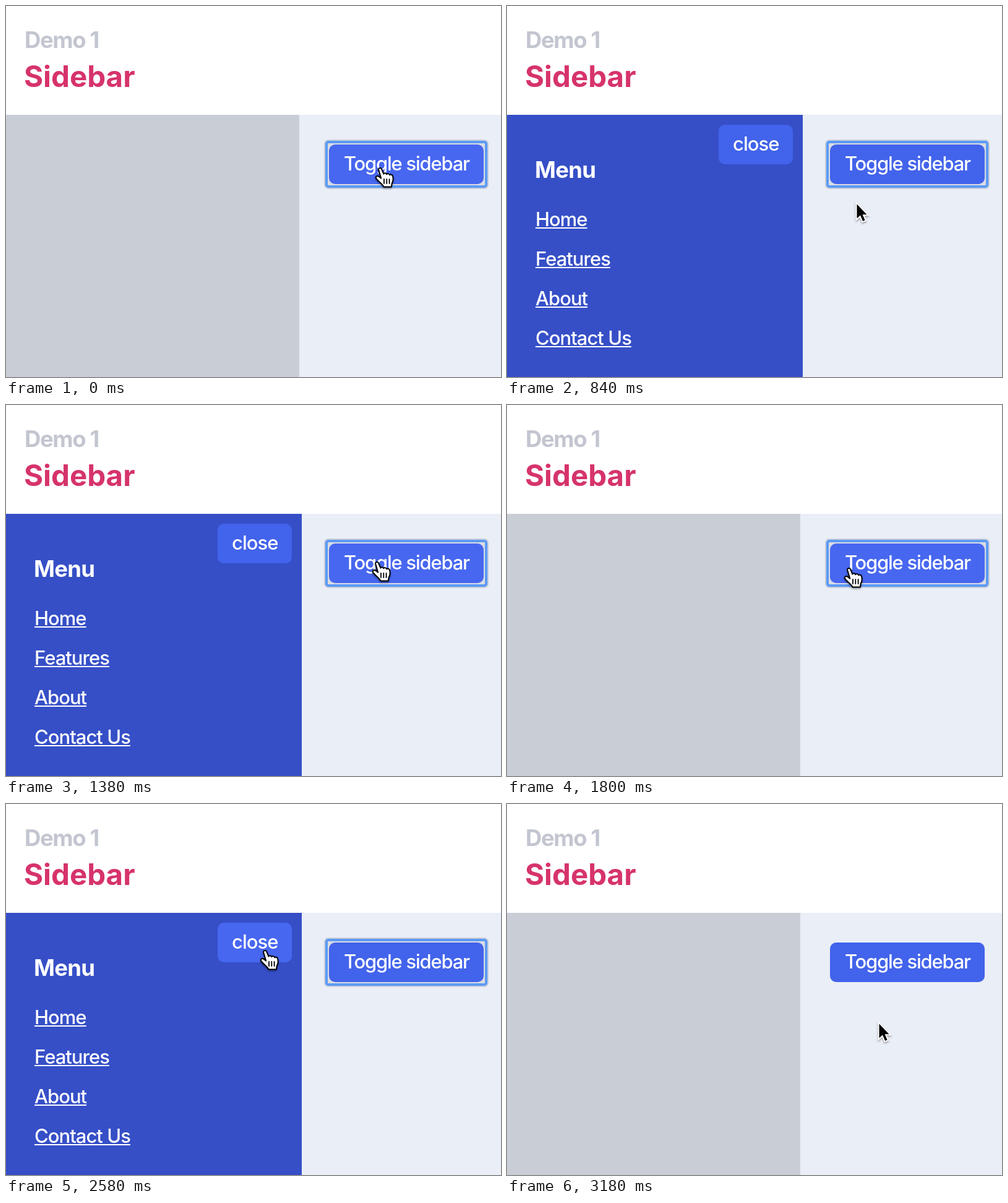
Recreate the animation shown at these times as an HTML page. Size 800x600 px, loop 3.24 s.

```html
<!DOCTYPE html>
<html lang="en">
<head>
<meta charset="utf-8">
<title>Sidebar demo</title>
<style>
  :root { --loop: 3240ms; --idle: #4263eb; --hover: #4767f0; }
  html, body { margin: 0; width: 100%; height: 100%; overflow: hidden; background: #fff; }
  .stage { position: relative; width: 800px; height: 600px; overflow: hidden; font-family: Inter, sans-serif; }
  .stage div, .stage svg { position: absolute; }

  /* left and top of a .text give the start of its baseline */
  .text { position: absolute; line-height: 0; margin-top: -.364em; white-space: nowrap;
          font-size: 31px; font-weight: 450; letter-spacing: -.032em; color: #fff; }
  .bold { font-weight: 700; font-size: 36.5px; }
  .link { left: 46px; text-decoration: underline; text-decoration-thickness: 2px;
          text-underline-offset: 2px; text-decoration-skip-ink: none; }

  .well { left: 0; top: 176px; width: 474px; height: 424px; background: #c9cdd5; }
  .main { left: 474px; top: 176px; width: 326px; height: 424px; background: #eaeef7; }
  .clip { left: 0; top: 176px; width: 478px; height: 424px; overflow: hidden; }
  .panel { inset: 0; background: #364fc7; animation: slide var(--loop) infinite; }

  .button { border-radius: 10px; background: var(--idle); }
  .toggle { left: 522px; top: 224px; width: 250px; height: 64px;
            animation: toggle-hover var(--loop) step-end infinite; }
  .close { left: 342px; top: 16px; width: 120px; height: 64px;
           animation: close-hover var(--loop) step-end infinite; }
  .ring { box-sizing: border-box; border: 4px solid #5b9af5; border-radius: 5px;
          background: #d9dce3; box-shadow: 0 0 0 2px #c8cdd8; }
  .toggle-ring { left: 516px; top: 218px; width: 262px; height: 76px;
                 animation: toggle-ring var(--loop) step-end infinite; }
  .close-ring { left: 336px; top: 10px; width: 132px; height: 76px;
                animation: close-ring var(--loop) step-end infinite; }

  .cursor { left: 0; top: 0; overflow: visible; animation: travel var(--loop) linear infinite;
            filter: drop-shadow(0 2px 1.5px rgba(0, 0, 0, .35)); }
  .hand { animation: hand var(--loop) step-end infinite; }
  .arrow { animation: arrow var(--loop) step-end infinite; }

  @keyframes slide {
    0%, 1% { transform: translateX(-100%); animation-timing-function: ease-out; }
    8.33%, 42.6% { transform: none; animation-timing-function: ease-in-out; }
    50%, 57% { transform: translateX(-100%); animation-timing-function: ease-out; }
    64%, 86.5% { transform: none; animation-timing-function: ease-in-out; }
    94%, 100% { transform: translateX(-100%); }
  }
  @keyframes travel {
    0%, 13% { transform: translate(604px, 262px); }
    18.5% { transform: translate(592px, 290px); }
    24%, 26% { transform: translate(564px, 317px); }
    32% { transform: translate(590px, 285px); }
    38%, 46% { transform: translate(599px, 254px); }
    53.7%, 57% { transform: translate(552px, 264px); }
    63%, 66.6% { transform: translate(564px, 269px); }
    74% { transform: translate(486px, 262px); }
    79.6%, 87% { transform: translate(418px, 237px); }
    90.7% { transform: translate(448px, 275px); }
    94.4% { transform: translate(510px, 317px); }
    98%, 100% { transform: translate(600px, 352px); }
  }
  @keyframes hand {
    0% { opacity: 1; }
    19% { opacity: 0; }
    31.5% { opacity: 1; }
    70.4% { opacity: 0; }
    77% { opacity: 1; }
    89%, 100% { opacity: 0; }
  }
  @keyframes arrow {
    0% { opacity: 0; }
    19% { opacity: 1; }
    31.5% { opacity: 0; }
    70.4% { opacity: 1; }
    77% { opacity: 0; }
    89%, 100% { opacity: 1; }
  }
  @keyframes toggle-hover {
    0% { background: var(--hover); }
    19% { background: var(--idle); }
    31.5% { background: var(--hover); }
    70.4%, 100% { background: var(--idle); }
  }
  @keyframes close-hover {
    0% { background: var(--idle); }
    77% { background: var(--hover); }
    89%, 100% { background: var(--idle); }
  }
  @keyframes toggle-ring { 0% { opacity: 1; } 85.18%, 100% { opacity: 0; } }
  @keyframes close-ring { 0% { opacity: 0; } 85.18%, 100% { opacity: 1; } }
</style>
</head>
<body>
<div class="stage">
  <span class="text bold" style="left:30px;top:68px;color:#c3c6d0;letter-spacing:-.038em">Demo 1</span>
  <span class="text bold" style="left:29px;top:131px;color:#d6336c;font-size:47.5px;letter-spacing:0">Sidebar</span>

  <div class="well"></div>
  <div class="main"></div>
  <div class="ring toggle-ring"></div>
  <div class="button toggle"><span class="text" style="left:24px;top:42px;letter-spacing:-.04em">Toggle sidebar</span></div>

  <div class="clip">
    <div class="panel">
      <div class="ring close-ring"></div>
      <div class="button close"><span class="text" style="left:23px;top:42px">close</span></div>
      <span class="text bold" style="left:45px;top:102px;letter-spacing:-.02em">Menu</span>
      <span class="text link" style="top:180px">Home</span>
      <span class="text link" style="top:244px">Features</span>
      <span class="text link" style="top:308px">About</span>
      <span class="text link" style="top:372px">Contact Us</span>
    </div>
  </div>

  <svg class="cursor" width="1" height="1">
    <g class="hand" fill="#fff" stroke="#000" stroke-width="2" stroke-linejoin="round" stroke-linecap="round">
      <path d="M-1.8 3C-2.4 -.2 1.8 -1.2 3.2 1.8L6.4 9.6C7.2 7.6 10.4 7.8 11.2 10.2
               C12.2 8.4 15.2 8.8 16.1 11.2C17.6 9.8 20.5 10.6 21.1 13.4
               C22.3 18 22 21 19.8 24.6L18.8 30.4H6.4C4.6 26.2 -3 21.2 -6 16.6
               C-7.2 13.6 -3.8 11.8 -1.6 13.8L2.2 16.6Z"/>
      <path d="M7 18v7M11.3 18v7M15.6 18v7" fill="none" stroke-width="1.8"/>
    </g>
    <path class="arrow" d="M1.5 3.5V26.5L7 21.5 11 31 14.6 29.5 10.6 20.2H17.5Z"
          stroke="#fff" stroke-width="4" paint-order="stroke"/>
  </svg>
</div>
</body>
</html>
```
